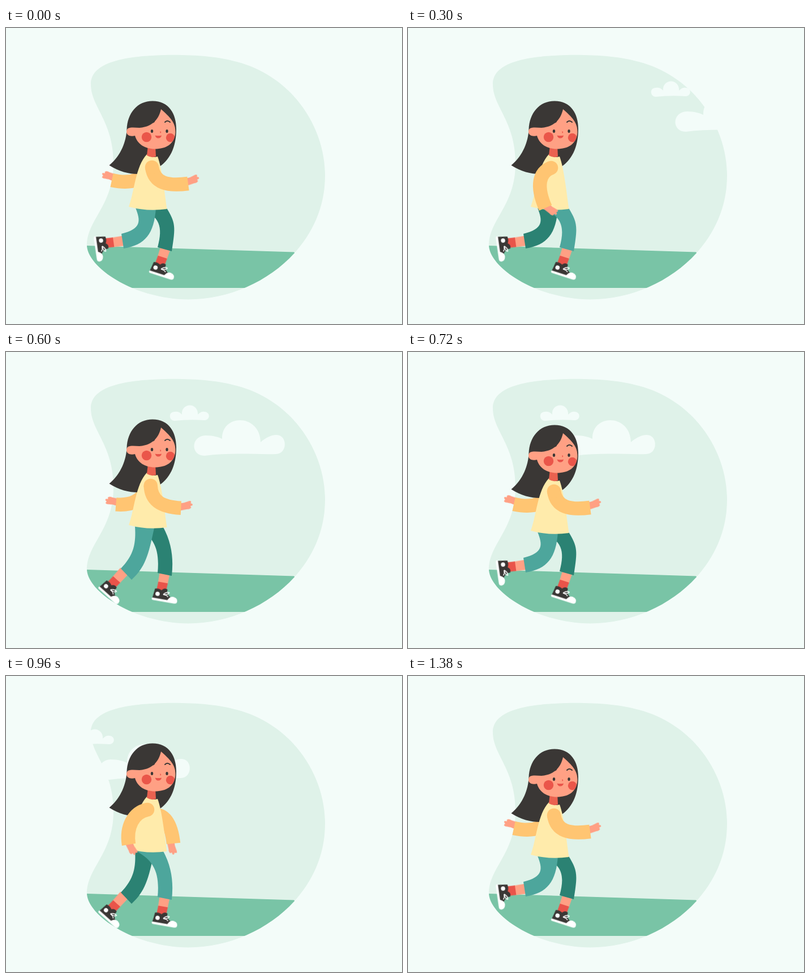
An HTML page without scripts that plays this animation: 700x525 px, repeating every 1.44 s.

```html
<!DOCTYPE html>
<html lang="en">
<head>
<meta charset="utf-8">
<title>Walking girl</title>
<style>
  html, body { margin: 0; height: 100%; overflow: hidden; background: #f3fcf9; }
  svg { display: block; width: 100vw; height: 100vh; }

  /* One walk cycle is 12 held poses of 60 ms; the small lead keeps poses clear of rounding. */
  .walk { animation: 720ms steps(1) -10ms infinite; }
  .far .walk { animation-delay: -370ms; }
  .clouds { animation: drift 1440ms steps(1) -10ms infinite; }
  .body { animation: bob 360ms steps(1) -10ms infinite; }
  .trouser { animation-name: trouser; }
  .foot { animation-name: foot; }
  .near-sleeve { animation-name: near-sleeve; }
  .near-hand { animation-name: near-hand; }
  .far-sleeve { animation-name: far-sleeve; }
  .far-hand { animation-name: far-hand; }
  .sleeve { fill: none; stroke: #ffc572; stroke-width: 24.5; marker-start: url(#shoulder); }

  @keyframes drift {
    0% { transform: translateX(224px); animation-timing-function: steps(16); }
    66.667% { transform: translateX(-224px); animation-timing-function: steps(8); }
    100% { transform: translateX(-464px); }
  }
  @keyframes bob {
    0%, 83.333%, 100% { transform: none; }
    16.667% { transform: translateY(-4px); }
    33.333% { transform: translateY(-15px); }
    50% { transform: translateY(-16px); }
    66.667% { transform: translateY(-10px); }
  }
  @keyframes trouser {
    0%, 91.667%, 100% { d: path("M229 319C238 342 240 356 204 365L208 391C246 385 262 365 265 319Z"); }
    8.333% { d: path("M258 318C272 336 282 350 240 364L247 388C300 362 302 358 287 318Z"); }
    16.667% { d: path("M252 316C282 332 285 340 264 377L285 390C310 345 315 345 280 303Z"); animation-timing-function: steps(2); }
    33.333% { d: path("M231 311C262 328 272 350 268 392L293 397C296 368 294 340 277 309Z"); }
    41.667% { d: path("M236 319C272 334 278 352 268 389L293 396C300 352 300 345 283 318Z"); }
    58.333% { d: path("M229 314C234 340 232 360 218 389L240 401C250 375 258 355 264 316Z"); }
    66.667% { d: path("M220 300C222 335 215 355 191 384L211 404C232 375 240 360 258 304Z"); animation-timing-function: steps(2); }
    83.333% { d: path("M228 309C230 340 226 360 203 384L222 404C246 382 252 360 262 312Z"); }
  }
  @keyframes foot {
    0%, 91.667%, 100% { transform: translate(204px, 378px) rotate(82deg); }
    8.333% { transform: translate(244px, 376px) rotate(78deg); }
    16.667% { transform: translate(275px, 384px) rotate(42deg); animation-timing-function: steps(2); }
    33.333% { transform: translate(280px, 395px) rotate(10deg); }
    41.667% { transform: translate(281px, 393px) rotate(18deg); }
    58.333% { transform: translate(224px, 394px) rotate(29deg); }
    66.667% { transform: translate(198px, 393px) rotate(43deg); animation-timing-function: steps(2); }
    83.333% { transform: translate(205px, 393px) rotate(42deg); }
  }
  @keyframes near-sleeve {
    0% { d: path("M258 247C262 275 285 281 322 276"); animation-timing-function: steps(3); }
    25% { d: path("M250 247C222 250 205 275 207 306"); }
    33.333% { d: path("M250 247C225 252 212 278 217 309"); }
    41.667% { d: path("M253 248C232 256 226 280 243 319"); animation-timing-function: steps(2); }
    58.333% { d: path("M255 250C240 266 240 289 266 316"); }
    66.667% { d: path("M251 247C246 273 255 293 284 308"); animation-timing-function: steps(3); }
    91.667%, 100% { d: path("M258 247C262 275 285 281 322 276"); }
  }
  @keyframes near-hand {
    0% { transform: translate(322px, 272px) rotate(-15deg); animation-timing-function: steps(3); }
    25% { transform: translate(208px, 306px) rotate(80deg); }
    33.333% { transform: translate(219px, 309px) rotate(68deg); }
    41.667% { transform: translate(247px, 318px) rotate(42deg); animation-timing-function: steps(2); }
    58.333% { transform: translate(267px, 317px) rotate(32deg); }
    66.667% { transform: translate(286px, 308px) rotate(10deg); animation-timing-function: steps(3); }
    91.667%, 100% { transform: translate(322px, 272px) rotate(-15deg); }
  }
  @keyframes far-sleeve {
    0% { d: path("M245 258C235 272 215 276 187 270"); animation-timing-function: steps(3); }
    25% { d: path("M262 256C288 256 300 280 304 305"); }
    33.333% { d: path("M262 256C285 256 293 280 296 307"); }
    41.667% { d: path("M257 256C257 270 256 285 255 298"); animation-timing-function: steps(2); }
    58.333% { d: path("M250 256C246 275 241 290 236 311"); }
    66.667% { d: path("M245 260C238 285 225 295 209 301"); animation-timing-function: steps(3); }
    91.667%, 100% { d: path("M245 258C235 272 215 276 187 270"); }
  }
  @keyframes far-hand {
    0% { transform: translate(189px, 265px) rotate(203deg); animation-timing-function: steps(3); }
    25% { transform: translate(302px, 305px) rotate(75deg); }
    33.333% { transform: translate(292px, 307px) rotate(82deg); }
    41.667% { transform: translate(255px, 298px) rotate(95deg); animation-timing-function: steps(2); }
    58.333% { transform: translate(233px, 312px) rotate(112deg); }
    66.667% { transform: translate(208px, 299px) rotate(183deg); animation-timing-function: steps(3); }
    91.667%, 100% { transform: translate(189px, 265px) rotate(203deg); }
  }
</style>
</head>
<body>
<svg viewBox="0 0 700 525">
  <defs>
    <path id="blob" d="M280 48C330 47 375 51 400 58C500 80 564 170 564 262C564 390 444 481.500 322 481.500C228 481 145 426 143 386C143 340 190 315 190 240C190 165 150 140 150 100C150 62 205 50 280 48Z"/>
    <clipPath id="blob-clip"><use href="#blob"/></clipPath>
    <path id="face" d="M274 144C271 158 262 175 236 177C226 177 213 174 213 184C213 191 221 193 228 191C232 206 246 214.500 263 214.500C283 214.500 298 206 299.500 185C300 168 290 158 274 144Z"/>
    <clipPath id="face-clip"><use href="#face"/></clipPath>
    <marker id="shoulder" viewBox="-1 -1 2 2" markerWidth="1" markerHeight="1" overflow="visible">
      <circle r="1" fill="#ffc572"/>
    </marker>
    <path id="hand" fill="#ffa084" d="M-4-6L5-6L15-8Q20-8 17-4L20-2Q21 1 16 1L17 4Q14 7 10 6L-4 7Z"/>
    <g id="shoe">
      <path fill="#ffa084" d="M-9-6H9L8.500 16H-8.500Z"/>
      <path fill="#e9544a" d="M-8.500 14H8.500L8 30H-9Z"/>
      <path fill="#3a3735" d="M-12 27Q-5 25 0 28Q4 22 10 25Q9 33 18 38L20 45H-14Z"/>
      <path fill="#fff" d="M-14 43.500H13Q16 36 22 36Q30.500 37 30.500 43Q30.500 47.500 25 47.500H-13Q-16 46 -14 43.500Z"/>
      <circle cx="-6" cy="35.500" r="3.800" fill="#fff"/>
      <path fill="none" stroke="#fff" stroke-width="1.500" d="M4 35Q9 29 14 30Q14 34 4 35Q12 35 13 38"/>
    </g>
  </defs>

  <rect width="700" height="525" fill="#f3fcf9"/>
  <use href="#blob" fill="#dff2e9"/>
  <path clip-path="url(#blob-clip)" fill="#79c4a6" d="M140 386L510 397.500V461H140Z"/>

  <g class="clouds" fill="#f3fcf9">
    <path d="M354 122C343 121 343 106 354 106Q362 105 367 111C366 102 372 94.500 381 94.500S396 103 395 111Q401 105 407 106C418 107 417 121 406 121Q380 119 354 122Z"/>
    <path d="M407 184C382 184 382 149 409 148C422 148 432 151 438 154C437 109 505 109 506 160C516 151 526 147 534 147C554 147 554 181 533 181C500 182 450 178 407 184Z"/>
  </g>

  <g class="body">
    <use class="walk far-hand" href="#hand"/>
    <path class="walk sleeve far-sleeve" d="M245 258C235 272 215 276 187 270"/>
  </g>

  <g class="far">
    <use class="walk foot" href="#shoe"/>
    <path class="walk trouser" fill="#2b8273" d="M236 319C272 334 278 352 268 389L293 396C300 352 300 345 283 318Z"/>
  </g>
  <g>
    <use class="walk foot" href="#shoe"/>
    <path class="walk trouser" fill="#4da69c" d="M229 319C238 342 240 356 204 365L208 391C246 385 262 365 265 319Z"/>
  </g>

  <g class="body">
    <path fill="#3a3735" d="M259 129.500C288 129.500 301 152 301 179C301 212 289 236 268 248C255 262 215 265 182.500 243.500C204 226 212.500 200 213.500 180C214.500 151 232 129.500 259 129.500Z"/>
    <path fill="#ffebab" d="M249 224Q257 231 268 228C276 250 280 290 284.500 321Q250 326 217 317C227 290 229 245 249 224Z"/>
    <path fill="#ea6250" d="M251 208H264L265 228Q257 231 249 226Z"/>
    <use href="#face" fill="#ffa084"/>
    <g clip-path="url(#face-clip)" fill="#ea564a">
      <circle cx="248.500" cy="193.500" r="8.700"/>
      <circle cx="290.500" cy="194.500" r="7.700"/>
    </g>
    <g fill="#3a3735">
      <ellipse cx="258" cy="183" rx="2.200" ry="3"/>
      <ellipse cx="284.500" cy="183" rx="2.200" ry="3"/>
    </g>
    <g fill="none" stroke="#3a3735" stroke-width="2" stroke-linecap="round">
      <path d="M281 167Q285 162.500 290 167"/>
      <path d="M260 167.500L262 166"/>
    </g>
    <path fill="none" stroke="#e9544a" stroke-width="1.300" d="M272.500 183.500Q274.500 185 272.500 186"/>
    <path fill="#e9544a" d="M263.500 190.500Q269 191.500 275 190.500Q274 195.500 269 195.500Q265 195.500 263.500 190.500Z"/>
    <use class="walk near-hand" href="#hand"/>
    <path class="walk sleeve near-sleeve" d="M258 247C262 275 285 281 322 276"/>
  </g>
</svg>
</body>
</html>
```
